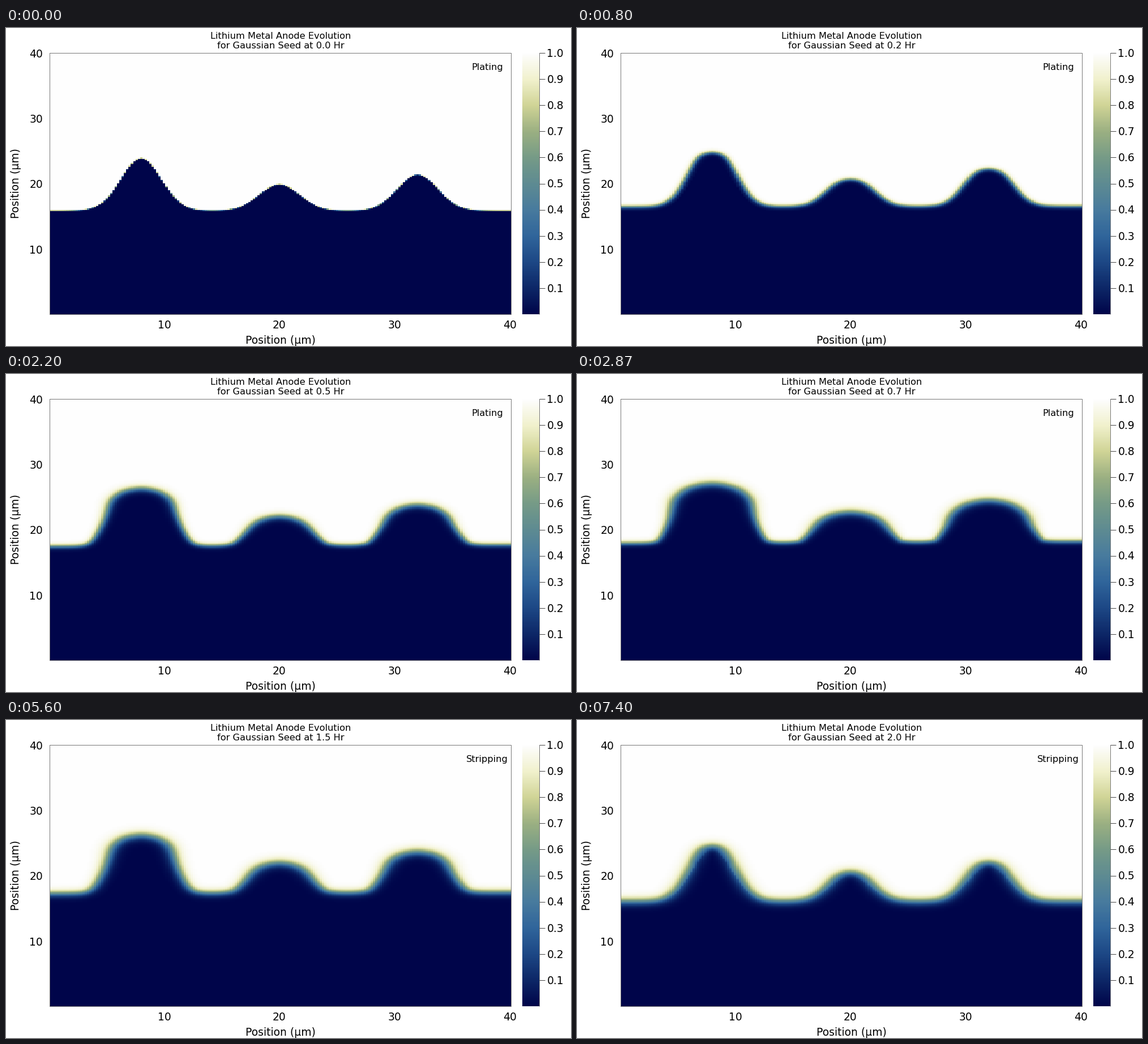
Write a matplotlib script that moves like this. It is 998 px wide and 561 px high and loops after 7.47 s.

```python
import numpy as np
import matplotlib.pyplot as plt
from matplotlib.animation import FuncAnimation
from matplotlib.colors import LinearSegmentedColormap

W, H, DPI = 998, 561, 64
LOOP_MS, FRAMES = 7470, 113            # the last frame holds the end state
HOURS, STEPS = 2.0, 111
L, R, TOP, BOT = 78, 892, 44, 505      # plot box in pixels
PT = 72 / DPI                          # points per pixel

# Position grid in micrometres, cell centres
N = 200
x = 0.2 * np.arange(1, N + 1)
y = x.copy()
gap2 = (x[:, None] - x[None, :]) ** 2

# Seeds: centre, height, extra growth speed at the tip
SEEDS = [(8, 8, 1.37), (20, 4, 0.78), (32, 5.5, 1.06)]
BASE = 15.96

# Levels across the diffuse interface
u = np.linspace(-1.7, 1.7, 19)[:, None]
level = 1 / (1 + np.exp(-3.2 * u[:, 0]))


def bell(c, width):
    return np.exp(-((x - c) / width) ** 2)


def foot(c):
    return np.exp(-(np.abs(x - c) - 3) ** 2)


seed = BASE + sum(a * bell(c, 2.47) for c, a, _ in SEEDS)
speed = 2.6 + 0.0105 * x + sum(p * bell(c, 1.15) - 0.3 * a / 8 * foot(c)
                               for c, a, p in SEEDS)
tip = sum(bell(c, 1.6) for c, *_ in SEEDS)


def reach(radius):
    """Height of a disc of each source column's radius above every column."""
    q = radius[:, :, None] ** 2 - gap2
    return np.where(q >= 0, np.sqrt(np.maximum(q, 0)), -np.inf)


def offset(radius):
    """Seed profile moved outward by radius, or inward where it is negative."""
    h = (seed[None, :, None] + reach(np.maximum(radius, 0))).max(axis=1)
    if radius.min() < 0:
        h = (h[:, :, None] - reach(np.maximum(-radius, 0))).min(axis=1)
    return h


def blur(t):
    wide, narrow = 1.1 * t ** 0.65, 0.6 * t ** 0.27
    return narrow + (wide - narrow) * tip


def field(t):
    if t <= 1:
        radius = np.maximum(speed * t + u * blur(t), 0)
    else:
        s = t - 1
        radius = (speed * (1 - s) + s * (0.2 + 0.4 * tip)
                  + u * (blur(1) * (1 - s) + s))
    h = offset(radius) + 0.1 * u
    cols = [np.interp(y, h[:, i], level, left=0, right=1) for i in range(N)]
    return np.array(cols).T[::-1]


stops = [(0, 5, 74), (13, 39, 103), (29, 72, 134), (48, 101, 155),
         (72, 123, 158), (94, 139, 146), (118, 155, 135), (155, 176, 130),
         (208, 212, 150), (241, 241, 205), (254, 254, 254)]
cmap = LinearSegmentedColormap.from_list("sea", np.array(stops) / 255, N=256)

plt.rcParams["font.family"] = "DejaVu Sans"
fig = plt.figure(figsize=(W / DPI, H / DPI), dpi=DPI, facecolor="white")
ax = fig.add_axes([0, 0, 1, 1])
ax.axis("off")


def image(data, box):
    return ax.imshow(data, extent=box, cmap=cmap, vmin=0, vmax=1,
                     aspect="auto", interpolation="nearest")


def label(px, py, s, size=18.7, ha="center", **kw):
    return ax.text(px, py, s, fontsize=size * PT, ha=ha, va="baseline",
                   color="black", **kw)


def line(xs, ys, color="#6a6a6a", width=0.9):
    ax.plot(xs, ys, color=color, lw=width * PT, solid_capstyle="butt")


heat = image(field(0), (L, R, BOT, TOP))
image(np.linspace(1, 0, 256)[:, None], (912, 942, BOT, TOP))
ax.set_xlim(0, W)
ax.set_ylim(H, 0)

left, right = L - 0.5, R + 0.4
line([left, right, right, left, left], [TOP, TOP, BOT, BOT, TOP])
line([942, 942], [TOP, BOT])

for v in (10, 20, 30, 40):
    label(L + (v - 0.1) * (R - L) / 40, 530.3, str(v))
    label(65, BOT - (v - 0.1) * (BOT - TOP) / 40 + 6.8, str(v), ha="right")
for k in range(1, 11):
    py = BOT - k * (BOT - TOP) / 10
    line([942, 952], [py, py], "#333333")
    label(955.5, py + 6.8, f"{k / 10:.1f}", ha="left")

label(485, 557, "Position (µm)")
label(23, 274.5, "Position (µm)", rotation=90, rotation_mode="anchor")
label(485, 18.5, "Lithium Metal Anode Evolution", 16.3)
title = label(485, 36.4, "", 16.3)
mode = label(850, 74.3, "", 16.3)


def update(i):
    t = HOURS * min(i / STEPS, 1)
    heat.set_data(field(t))
    title.set_text(f"for Gaussian Seed at {np.floor(t * 10 + 1e-9) / 10:.1f} Hr")
    mode.set_text("Plating" if t <= 1 else "Stripping")
    return heat, title, mode


anim = FuncAnimation(fig, update, frames=FRAMES, interval=LOOP_MS / FRAMES,
                     repeat=True, repeat_delay=0, blit=False)
plt.show()
```
